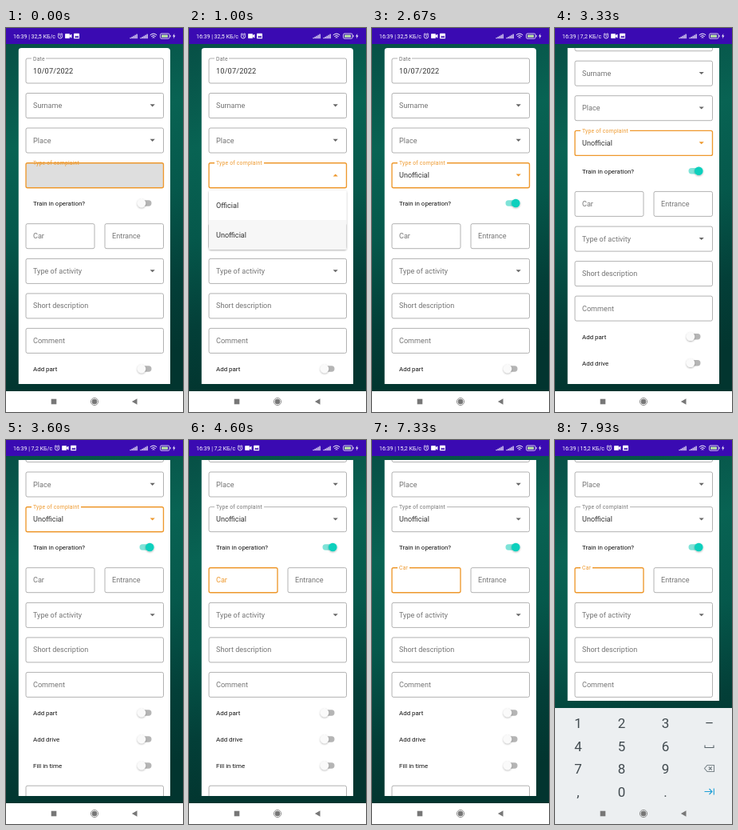
These frames come from a looping animation (222x480 px, 8 s). An HTML page:

```html
<!DOCTYPE html>
<html lang="en">
<head>
<meta charset="utf-8">
<title>Complaint form</title>
<style>
html, body { margin: 0; width: 100%; height: 100%; overflow: hidden; background: #fff; }
svg { display: block; width: 222px; height: 480px; font-family: Roboto, sans-serif; }
</style>
</head>
<body>
<svg id="stage" viewBox="0 0 222 480" xmlns="http://www.w3.org/2000/svg">
  <defs>
    <linearGradient id="bg" x1="0" y1="0" x2="0.15" y2="1">
      <stop offset="0" stop-color="#075046"/>
      <stop offset="0.3" stop-color="#086353"/>
      <stop offset="0.55" stop-color="#05584b"/>
      <stop offset="0.8" stop-color="#033f38"/>
      <stop offset="1" stop-color="#02352f"/>
    </linearGradient>
    <clipPath id="view"><rect id="viewRect" x="15.5" y="25" width="190.5" height="420"/></clipPath>
    <filter id="shade" x="-30%" y="-30%" width="160%" height="170%">
      <feDropShadow dx="0" dy="0.8" stdDeviation="0.9" flood-opacity="0.35"/>
    </filter>
  </defs>
  <rect y="20" width="222" height="435" fill="url(#bg)"/>
  <g clip-path="url(#view)">
    <g id="form"><rect x="15.5" y="25" width="190.5" height="640" rx="4" fill="#fff"/></g>
  </g>
  <g id="status"><rect width="222" height="20" fill="#3a0ab2"/></g>
  <g id="keys"><rect y="335" width="222" height="145" fill="#eceff1"/></g>
  <g id="nav">
    <rect id="navBg" y="454" width="222" height="26" fill="#fff"/>
    <rect x="56.7" y="463.7" width="6.6" height="6.6" fill="#777"/>
    <circle cx="111" cy="467" r="4.6" fill="none" stroke="#777" stroke-width="0.8"/>
    <circle cx="111" cy="467" r="3.3" fill="#777"/>
    <path d="M164.5 463.2v7.6l-6.6-3.8z" fill="#777"/>
  </g>
</svg>
<script>
const NS = "http://www.w3.org/2000/svg";
const LOOP = 8000;
const ORANGE = "#ee982c", LINE = "#999", HINT = "#757575", INK = "#333";
const $ = id => document.getElementById(id);

function set(node, attrs) {
  for (const k in attrs) node.setAttribute(k, attrs[k]);
  return node;
}
function add(parent, tag, attrs, text) {
  const node = set(document.createElementNS(NS, tag), attrs);
  if (text !== undefined) node.textContent = text;
  parent.appendChild(node);
  return node;
}
const clamp = v => Math.max(0, Math.min(1, v));
const ramp = (t, a, b) => clamp((t - a) / (b - a));
const smooth = p => p * p * (3 - 2 * p);
const easeOut = p => 1 - (1 - p) ** 3;
const mix = (a, b, p) => a + (b - a) * p;

// Outlined box with a gap of the given width in its top edge
function outline(x, y, w, gap) {
  const a = x + 7, b = gap ? a + gap : a, h = 27;
  return `M${b} ${y}H${x + w - 2}a2 2 0 0 1 2 2v${h}a2 2 0 0 1-2 2H${x + 2}` +
    `a2 2 0 0 1-2-2v${-h}a2 2 0 0 1 2-2H${a}`;
}

const form = $("form");
function field(mid, hint, x = 25, w = 172.5, arrow = false) {
  const y = mid - 15.3;
  const f = { x, y, w, mid };
  f.fill = add(form, "rect", { x, y, width: w, height: 31, rx: 2, fill: "#dedede", opacity: 0 });
  f.box = add(form, "path", { d: outline(x, y, w, 0), fill: "none", stroke: LINE, "stroke-width": 0.75 });
  f.label = add(form, "text", { x: x + 9, y: mid + 3.2, "font-size": 9.1, fill: HINT }, hint);
  if (arrow) f.arrow = add(form, "path", { d: `M180.6 ${mid - 1.5}h6.2l-3.1 3.1z`, fill: "#666" });
  return f;
}
function floatLabel(f, p, gap) {
  set(f.label, {
    y: mix(f.mid + 3.2, f.y + 2.5, p),
    "font-size": mix(9.1, 6.8, p),
    "letter-spacing": 0.22 * p
  });
  set(f.box, { d: outline(f.x, f.y, f.w, gap * p) });
}
function focus(f, on) {
  set(f.box, { stroke: on ? ORANGE : LINE, "stroke-width": on ? 1.35 : 0.75 });
  set(f.label, { fill: on ? ORANGE : HINT });
  if (f.arrow) set(f.arrow, { fill: on ? ORANGE : "#666" });
}
function toggle(mid, name) {
  add(form, "text", { x: 34, y: mid + 2.8, "font-size": 7.95, fill: "#111" }, name);
  return {
    track: add(form, "rect", { x: 167.5, y: mid - 3.7, width: 15, height: 7.4, rx: 3.7, fill: "#b5b5b5" }),
    thumb: add(form, "circle", { cx: 170, cy: mid, r: 5.3, fill: "#fafafa", filter: "url(#shade)" })
  };
}

const date = field(53.3, "Date");
floatLabel(date, 1, 18);
add(form, "text", { x: 34, y: 56.6, "font-size": 9.2, "letter-spacing": 0.15, fill: INK }, "10/07/2022");
field(96.8, "Surname", 25, 172.5, true);
field(140.3, "Place", 25, 172.5, true);
const kind = field(184, "Type of complaint", 25, 172.5, true);
const kindValue = add(form, "text", { x: 34, y: 187.2, "font-size": 9.1, fill: INK }, "Unofficial");
const train = toggle(219, "Train in operation?");
const car = field(260, "Car", 25, 86);
field(260, "Entrance", 124, 73.5);
field(303.7, "Type of activity", 25, 172.5, true);
field(347.2, "Short description");
field(390.7, "Comment");
toggle(426, "Add part");
toggle(459, "Add drive");
toggle(492, "Fill in time");
field(532.5, "");
const caret = add(form, "rect", { x: 33.7, y: 253, width: 0.9, height: 14, fill: "#6200ee" });

const menu = add(form, "g", { opacity: 0 });
add(menu, "rect", { x: 25, y: 203, width: 172.5, height: 74, rx: 2, fill: "#fff", filter: "url(#shade)" });
const pressed = add(menu, "rect", { x: 25, y: 240, width: 172.5, height: 37, fill: "#dedede", opacity: 0 });
["Official", "Unofficial"].forEach((s, i) =>
  add(menu, "text", { x: 34, y: 224.7 + 37 * i, "font-size": 9.1, fill: INK }, s));

// Status bar
const status = $("status");
const clock = add(status, "text", { x: 9, y: 12.6, "font-size": 7, fill: "#fff" });
const icons = add(status, "g", { fill: "none", stroke: "#fff", "stroke-width": 0.8 });
add(icons, "circle", { cx: 68, cy: 10.3, r: 2.7 });
add(icons, "path", { d: "M68 8.7v1.8l1.2.7M64.8 8l1.8-1.5M71.2 8l-1.8-1.5" });
add(icons, "path", { d: "M74.5 7.6h5v5h-5zM79.5 10l2.5-2v4.2z", fill: "#fff" });
add(icons, "rect", { x: 85, y: 6.7, width: 7, height: 6.6, rx: 0.6, fill: "#fff", stroke: "none" });
add(icons, "path", { d: "M86 12l1.8-2.4 1.2 1.3 1.2-1.7 1.2 2.8z", fill: "#3a0ab2", stroke: "none" });
for (const x of [155.5, 168.5])
  for (let i = 0; i < 5; i++)
    add(status, "rect", { x: x + i * 2, y: 12 - i * 1.1, width: 1.2, height: 1.2 + i * 1.1, fill: "#fff" });
add(status, "path", {
  d: "M180.8 8.9q4.2-3.6 8.4 0M182.3 10.6q2.7-2.3 5.4 0M183.7 12.2q1.3-1.1 2.6 0",
  fill: "none", stroke: "#fff", "stroke-width": 0.95
});
add(status, "rect", { x: 193.5, y: 7, width: 11.5, height: 6.2, rx: 1.5, fill: "none", stroke: "#fff", "stroke-width": 0.8 });
add(status, "rect", { x: 195, y: 8.4, width: 8, height: 3.4, rx: 0.5, fill: "#b9e4a5" });
add(status, "rect", { x: 205.6, y: 9, width: 0.9, height: 2.2, fill: "#fff" });
add(status, "path", { d: "M211.4 6.8l-2.4 3.7h1.6l-.7 3 2.5-3.9h-1.7z", fill: "#fff" });

// Numeric keyboard
const keys = $("keys");
const cols = [29, 83.5, 138.5, 193.5];
["123–", "456", "789", ",0."].forEach((row, r) =>
  [...row].forEach((c, i) => add(keys, "text", {
    x: cols[i], y: 360 + r * 28.6, "font-size": 17, "text-anchor": "middle", fill: "#414a4f"
  }, c)));
const glyph = (d, stroke) => add(keys, "path", { d, fill: "none", stroke, "stroke-width": 1.1 });
glyph("M188 381.5v3h11v-3", "#59646a");
glyph("M191 406.5h8.5v8H191l-3.5-4zM192.8 408.5l4 4m0-4l-4 4", "#7b858a");
glyph("M187.5 439.5h9.5m-3.5-3.5l3.5 3.5l-3.5 3.5M199.3 435.5v8", "#1f9fd6");

function draw(t) {
  // Dropdown
  const closing = ramp(t, 1330, 1530);
  const open = smooth(ramp(t, 200, 430)) * (1 - closing);
  const ripple = 1 - ramp(t, 70, 400);
  set(kind.fill, { opacity: ripple });
  floatLabel(kind, 1, ripple === 1 ? 0 : 62);
  focus(kind, t < 4600);
  set(kind.arrow, {
    opacity: 1 - ripple,
    transform: `rotate(${180 * open} 183.7 184)`
  });
  set(kindValue, { opacity: t >= 1330 ? 1 : 0 });
  set(menu, { opacity: open });
  set(pressed, { opacity: ramp(t, 960, 1130) });

  // Switch
  const on = smooth(ramp(t, 2130, 2350));
  set(train.thumb, { cx: mix(170, 180.3, on), fill: on > 0.5 ? "#08d0bd" : "#fafafa" });
  set(train.track, { fill: on > 0.5 ? "#7fe3d8" : "#b5b5b5" });

  // Scrolling
  const scroll = 85 * smooth(ramp(t, 3080, 3600));
  set(form, { transform: `translate(0 ${-scroll})` });

  // Car field and its caret
  floatLabel(car, smooth(ramp(t, 4600, 4770)), 15);
  focus(car, t >= 4600);
  const lit = t >= 4700 && t < 7200 && (t - 4700) % 1000 < 500;
  set(caret, { opacity: lit ? 1 : 0 });

  // Network speed
  const slow = t >= 2730 && t < 6730;
  clock.textContent = `16:39 | ${t < 2730 ? "32,5" : slow ? "7,2" : "15,2"} КБ/с`;
  set(icons, { transform: `translate(${slow ? -3.9 : 0} 0)` });

  // Keyboard pushes up the lower edge of the card
  const rise = easeOut(ramp(t, 7400, 7700));
  const top = mix(454, 335, rise);
  set(keys, { transform: `translate(0 ${top - 335})` });
  set($("viewRect"), { height: top - 9 - 25 });
  set($("navBg"), { fill: rise > 0 ? "#eceff1" : "#fff" });
}

const start = performance.now();
function tick() {
  draw((performance.now() - start) % LOOP);
  requestAnimationFrame(tick);
}
draw(0);
requestAnimationFrame(tick);
</script>
</body>
</html>
```
